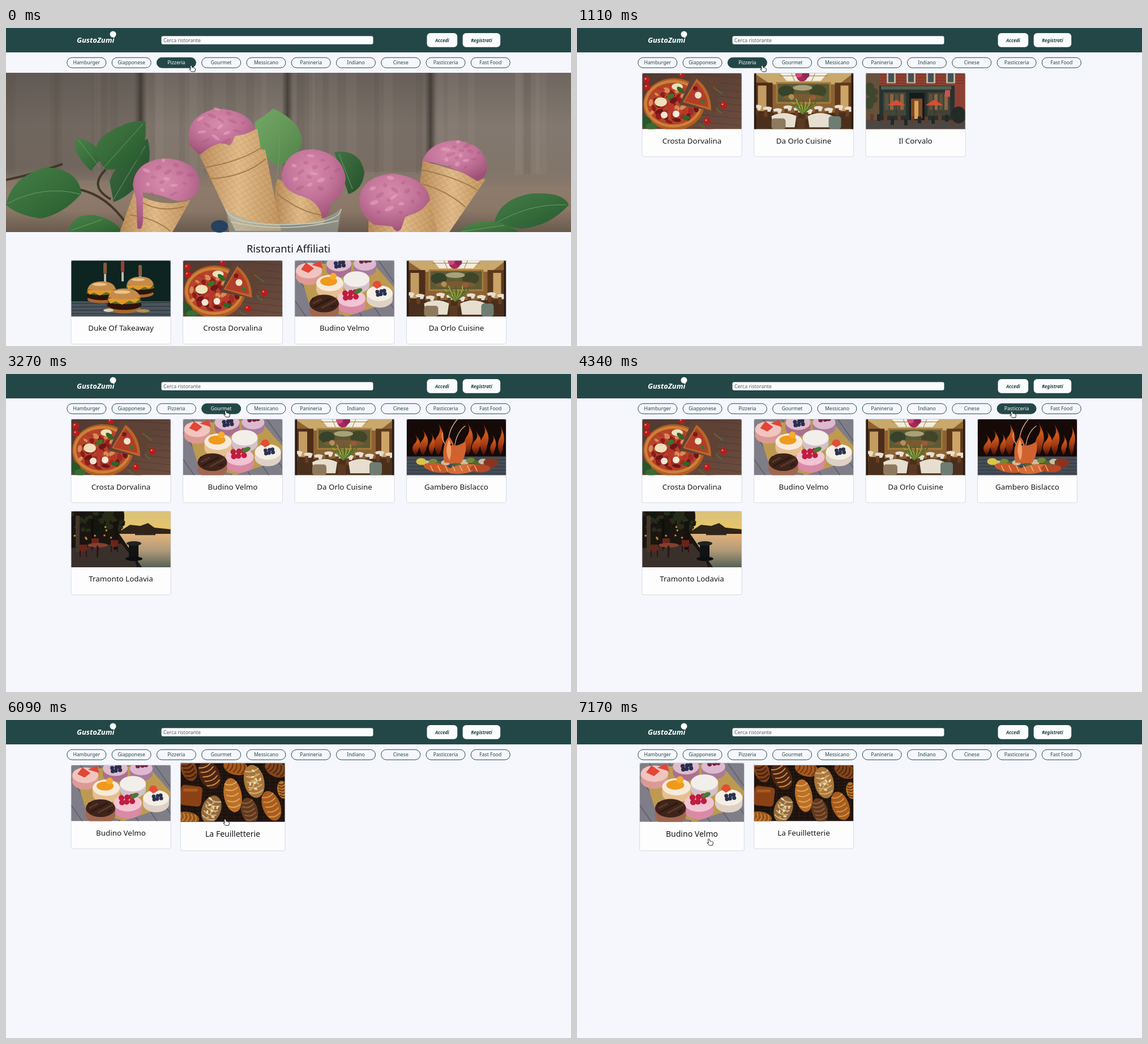
These frames come from a looping animation (998 px wide and 561 px high, 7.2 s). An HTML page:

```html
<!DOCTYPE html>
<html lang="it">
<head>
<meta charset="utf-8">
<title>Ristoranti</title>
<style>
  html, body { margin: 0; width: 100%; height: 100%; overflow: hidden; background: #f5f7fd; }
  #stage { display: block; width: 100vw; height: 100vh; font-family: "Noto Sans", "Open Sans", sans-serif; font-weight: 500; }
  .mid { text-anchor: middle; }
</style>
</head>
<body>
<svg id="stage" viewBox="0 0 998 561"></svg>
<script>
const LOOP = 7200, DARK = '#234747', PAGE = '#f5f7fd', INK = '#15191c';
const stage = document.getElementById('stage');

// Shape helpers
const box = (x, y, w, h, fill, more = '') => `<rect x="${x}" y="${y}" width="${w}" height="${h}" fill="${fill}" ${more}/>`;
const oval = (x, y, rx, ry, fill, turn = 0) =>
  `<ellipse cx="${x}" cy="${y}" rx="${rx}" ry="${ry}" fill="${fill}" transform="rotate(${turn} ${x} ${y})"/>`;
const dot = (x, y, r, fill) => oval(x, y, r, r, fill);
const shape = (d, fill) => `<path d="${d}" fill="${fill}"/>`;
const line = (d, color, width = 1) => `<path d="${d}" fill="none" stroke="${color}" stroke-width="${width}"/>`;
const text = (x, y, size, label, more = '') => `<text x="${x}" y="${y}" font-size="${size}" ${more}>${label}</text>`;
const repeat = (n, draw) => Array.from({ length: n }, (_, i) => draw(i)).join('');
const stops = colors => colors.map((c, i) => `<stop offset="${i / (colors.length - 1)}" stop-color="${c}"/>`).join('');
const gradient = (id, colors, dir = 'x2="0" y2="1"') => `<linearGradient id="${id}" ${dir}>${stops(colors)}</linearGradient>`;
const glow = (id, colors) => `<radialGradient id="${id}" cx=".45" cy=".32" r=".72">${stops(colors)}</radialGradient>`;
function seeded(seed) {
  return (lo, hi) => {
    seed = (seed * 16807) % 2147483647;
    return +(lo + (hi - lo) * seed / 2147483647).toFixed(1);
  };
}

// Card pictures, each 176 x 99
function burgers() {
  const knife = (x, y, c) => box(x - 3, y, 6, 20, c, 'rx="2"') + box(x - 2, y + 20, 4, 16, '#b9b9ae');
  const burger = (x, y, s) => `<g transform="translate(${x} ${y}) scale(${s})">` +
    oval(0, 16, 28, 8, '#a8672f') + oval(0, 9, 30, 9, '#2a140d') + oval(0, 3, 30, 5, '#5c6a2c') +
    shape('M-29-2 L29-2 L18 6 L9 2 L-4 9 L-15 3 L-24 7Z', '#e09a28') +
    shape('M-28-3 Q-24-19 0-19 Q24-19 28-3 Q0 2-28-3Z', '#c68b4b') + oval(-4, -13, 14, 3, '#e9c48d') + '</g>';
  return box(0, 0, 176, 99, '#0d2420') + box(0, 72, 176, 27, '#4a555d') +
    repeat(4, i => line(`M0 ${76 + i * 6} L176 ${74 + i * 7}`, '#2f3940', 1.5)) +
    knife(60, 4, '#8d5938') + knife(122, 8, '#8d5938') +
    burger(54, 54, .9) + burger(122, 45, .85) + knife(91, 1, '#a23b33') + burger(94, 69, 1.02) +
    oval(66, 88, 9, 3, '#d9cfb5') + oval(127, 89, 12, 3, '#b58e4d');
}

function pizza() {
  const rnd = seeded(41);
  const tomato = (x, y, r = 6) => dot(x, y, r, '#b81c1a') + dot(x - 2, y - 2, r / 4, '#f0876d');
  const toppings = repeat(44, i => {
    const a = i * 2.4, d = Math.sqrt(i / 44);
    return oval(55 + 43 * d * Math.cos(a), 55 + 33 * d * Math.sin(a), rnd(4, 8), rnd(2, 5),
      ['#8e1d1c', '#b5382a', '#6f1519', '#d98a55', '#a32b25'][i % 5], rnd(0, 180));
  });
  return box(0, 0, 176, 99, 'url(#table)') +
    repeat(9, i => line(`M90 ${i * 12} L176 ${i * 12 + 9}`, '#4b362c', .7)) +
    oval(56, 55, 54, 46, '#ae5c24') + oval(55, 54, 51, 42, '#cd8038') + oval(55, 54, 46, 37, '#b4442a') + toppings +
    shape('M66 56 L88 4 L140 10 L130 68Z', '#604235') +
    shape('M72 51 L96 10 Q122 30 122 66Z', '#b9652a') + shape('M75 50 L96 16 Q115 34 117 60Z', '#b23d28') +
    dot(99, 39, 6, '#f0e4cb') + dot(94, 27, 4, '#7c1a1b') + oval(107, 50, 5, 3, '#3d742b', 40) +
    oval(33, 51, 11, 8, '#f0dfb8') + oval(60, 72, 6, 6, '#f4ecd9') + dot(39, 74, 6, '#efe6d2') + oval(62, 24, 10, 6, '#eee0bd') +
    oval(68, 30, 8, 4, '#2f6426', 40) + oval(50, 41, 7, 4, '#3d742b', -30) + oval(78, 79, 7, 4, '#2f6426') +
    tomato(8, 12) + tomato(9, 25) + tomato(144, 57) + tomato(115, 85) + tomato(70, 4, 5) +
    oval(5, 85, 15, 9, '#28552a', 40) + oval(16, 94, 10, 6, '#376c33') +
    line('M126 25 L143 38 M130 62 L140 71 M100 90 L111 97', '#5a6838', 2);
}

function mousse() {
  const cake = (x, y, r, side, top) => oval(x, y + r * .48, r, r * .62, side) + box(x - r, y, 2 * r, r * .48, side) + oval(x, y, r, r * .6, top);
  const berries = (x, y, n, r, color) => repeat(n, i => dot(x + (i % 3 - 1) * r * 1.8 + i % 2, y + (Math.floor(i / 3) - .5) * r * 1.6 - i % 3, r, color));
  return box(0, 0, 176, 99, '#7f7d87') + repeat(7, i => line(`M${i * 33 - 50} 0 L${i * 33 + 20} 99`, '#5f5d67', 1.5)) +
    shape('M5 9 L134 0 L176 48 L172 72 L92 99 L25 75Z', '#bd9a50') +
    cake(25, 18, 23, '#dc9a94', '#f0c5c0') + cake(78, 6, 22, '#a9708f', '#dfbccb') + cake(124, 6, 20, '#a77c9b', '#ddb9d1') +
    berries(79, 8, 6, 3.6, '#2a2e50') + berries(125, 5, 3, 4, '#71243d') +
    shape('M11 16 L20 4 L34 14 L24 22Z M30 8 L45 1 L50 14Z', '#e34536') +
    cake(62, 40, 24, '#e6bf92', '#f6eadb') + oval(60, 37, 15, 8, '#f09a1c') + dot(68, 28, 6, '#f5ad2e') +
    cake(109, 33, 23, '#d3c0c8', '#f2eeea') + cake(150, 58, 23, '#dfd1c5', '#f5eee4') +
    berries(152, 58, 6, 3.4, '#283250') + shape('M137 44 Q140 33 150 37 L154 45 L145 50Z', '#e34d36') +
    cake(100, 67, 25, '#d98aa6', '#f2c4d2') + berries(98, 62, 6, 5, '#c01c41') + oval(112, 54, 8, 4, '#487a35', -25) +
    cake(52, 76, 26, '#a06750', '#3e241a') + repeat(22, i => dot(32 + i * 1.9, 68 + i * 7 % 16, 2, i % 2 ? '#5d3a2b' : '#2c1812'));
}

function diningRoom() {
  const table = (x, y, w) => shape(`M${x - w} ${y} Q${x} ${y - w / 2} ${x + w} ${y} L${x + w - 3} ${y + w * .9} L${x - w + 3} ${y + w * .9}Z`, '#e6dfd0');
  return box(0, 0, 176, 99, '#8d6233') + shape('M0 0 H176 L150 20 H30Z', '#c9a86c') + shape('M46 0 H130 L118 14 H58Z', '#f3eddd') +
    line('M66 0 L72 14 M108 0 L102 14 M46 5 H130', '#8f7a50') + box(0, 17, 33, 56, '#4c2d1a') + box(143, 17, 33, 56, '#5d391b') +
    box(7, 22, 15, 45, '#c39c62') + box(153, 22, 14, 45, '#cda468') +
    box(39, 16, 97, 38, '#a57a3a') + box(42, 19, 91, 32, '#5c5a35') +
    oval(57, 32, 14, 10, '#37422a') + oval(113, 32, 15, 11, '#424628') + oval(86, 26, 17, 5, '#a8a279') + oval(87, 43, 36, 6, '#7a5a33') +
    oval(66, 42, 5, 5, '#b58d58') + oval(104, 43, 6, 4, '#9a5b36') +
    box(0, 70, 176, 29, '#4a2f1d') + dot(85, 5, 10, '#a32a5c') + dot(79, 2, 6, '#d24b77') + dot(92, 3, 6, '#8e2555') +
    repeat(10, i => table(6 + i * 18, 58 + i * 3 % 8, 8) + box(i * 18, 62 + i * 3 % 8, 6, 12, '#6a3f22')) +
    table(53, 76, 22) + table(117, 76, 22) + box(31, 80, 25, 19, '#8d7a5c', 'rx="5"') + box(132, 76, 22, 23, '#6e7c72', 'rx="5"') + box(76, 80, 14, 19, '#5b3a23') +
    repeat(13, i => line(`M86 72 Q${66 + i * 4} 53 ${62 + i * 4} ${45 + i % 3 * 6}`, i % 2 ? '#92a83c' : '#476a2a', 2)) +
    box(0, 0, 4, 99, '#2b1b14') + box(172, 0, 4, 99, '#2b1b14');
}

function brickHouse() {
  const parasol = (x, y) => line(`M${x} ${y} V${y + 22}`, '#38241f') + shape(`M${x - 16} ${y + 6} L${x} ${y - 4} L${x + 16} ${y + 6}Z`, '#d35035');
  const rnd = seeded(8);
  return box(0, 0, 176, 99, '#8d4032') + repeat(4, i => line(`M0 ${i * 5 + 3} H176`, '#74352c')) +
    box(0, 0, 25, 99, '#66513b') + repeat(4, i => box(37 + i * 35, 0, 16, 18, '#c3b99d') + box(40 + i * 35, 0, 10, 16, '#465056')) +
    box(24, 22, 133, 62, '#27322e') + box(27, 23, 124, 6, '#526052') + box(31, 34, 40, 41, '#43463a') + box(109, 34, 40, 41, '#414237') +
    repeat(8, i => box(34 + i % 4 * 9 + (i > 3 ? 78 : 0), 37, 6, 28, i % 2 ? '#8b6640' : '#59513d')) +
    box(77, 35, 27, 49, '#151b1b') + box(80, 45, 20, 35, '#7d4a24') + box(86, 49, 7, 32, '#d9a55c') +
    box(0, 83, 176, 16, '#4d4743') + parasol(54, 51) + parasol(121, 51) + box(140, 30, 9, 12, '#cf5052') +
    repeat(14, i => box(8 + i * 12, rnd(72, 83), 6, 12, i % 2 ? '#2a2522' : '#643c2b')) +
    repeat(9, () => oval(rnd(0, 18), rnd(20, 80), 8, 7, '#3f4730')) + oval(164, 74, 13, 15, '#242b27');
}

function seafood() {
  const rnd = seeded(19);
  const flame = (x, h, w) => shape(`M${x} 64 Q${x - w * 2} ${64 - h / 3} ${x} ${64 - h * .6} Q${x + w} ${64 - h * .8} ${x - 2} ${64 - h} Q${x + w * 2.4} ${64 - h * .6} ${x + w} ${64 - h * .3} Q${x + w} 56 ${x} 64Z`, 'url(#fire)');
  return box(0, 0, 176, 99, '#150a08') +
    repeat(9, i => flame([16, 29, 44, 56, 108, 122, 136, 152, 166][i], rnd(38, 62), rnd(4, 7))) +
    box(0, 66, 176, 33, '#454e57') + repeat(5, i => line(`M0 ${72 + i * 6} H176`, '#333c44', 1.5)) +
    repeat(12, i => oval(25 + i * 11, 73 + i * 5 % 8, 8, 5, ['#4f6a2a', '#c4bfa5', '#748736'][i % 3])) +
    oval(26, 75, 9, 6, '#dcc543') + oval(149, 77, 13, 8, '#8a3420') +
    line('M78 62 Q66 28 90 0 M84 60 Q85 25 104 12 M80 60 Q58 35 64 24', '#e9b18a', 1.3) +
    shape('M67 77 Q60 50 75 30 Q80 36 84 47 Q96 46 104 39 Q108 60 96 78Z', '#d0622f') +
    shape('M75 35 Q66 58 76 73 Q82 56 75 35Z', '#f1a16a') +
    oval(54, 86, 24, 8, '#cb5a29', 10) + oval(100, 88, 28, 8, '#d46d38', -8) + oval(130, 87, 18, 7, '#b94725') +
    repeat(7, i => line(`M${42 + i * 13} 82 l5 10`, '#f3b184', 1.5)) + dot(79, 45, 1.5, '#1b0d0a');
}

function waterside() {
  const rnd = seeded(77);
  const chair = (x, y) => box(x, y, 13, 12, '#6b241b') + line(`M${x + 1} ${y + 10} V${y + 22} M${x + 12} ${y + 10} V${y + 22}`, '#35120f', 2);
  return box(0, 0, 176, 99, 'url(#dusk)') + shape('M90 33 L104 24 L122 26 L136 21 L147 29 L176 32 V40 H80Z', '#2e2419') +
    shape('M74 40 H176 V99 H122Z', 'url(#lake)') + line('M113 41 H149 M125 40 L132 35', '#33271e', 2.5) +
    shape('M0 0 H93 Q97 19 85 40 L125 99 H0Z', '#1a1510') + shape('M0 65 L89 57 L122 99 H0Z', '#3a302b') +
    repeat(45, () => oval(rnd(0, 92), rnd(0, 34), rnd(3, 9), rnd(2, 5), rnd(0, 1) > .5 ? '#10170f' : '#272c1a', rnd(0, 180))) +
    box(8, 8, 7, 64, '#44372a') + box(35, 15, 5, 50, '#110e0a') + box(75, 18, 8, 50, '#15110d') +
    repeat(8, () => dot(rnd(5, 75), rnd(25, 50), 1.8, '#c9842f')) +
    chair(15, 59) + chair(36, 48) + chair(70, 51) + oval(47, 60, 18, 4, '#84402f') + box(45, 61, 3, 21, '#2a1713') +
    box(102, 57, 17, 27, '#101214', 'rx="3"') + oval(111, 57, 13, 4, '#202123') + oval(111, 84, 15, 4, '#0c0e10') + line('M114 86 L118 99', '#161719', 3);
}

function pastries() {
  const bun = (x, y, a, b, turn, c, stripe) => `<g transform="translate(${x} ${y}) rotate(${turn})">` + oval(0, 0, a, b, c) +
    repeat(5, i => line(`M${(i - 2) * a * .33 - 2} ${-b * .7} Q${(i - 2) * a * .33 + 5} 0 ${(i - 2) * a * .33 - 2} ${b * .7}`, stripe, 2)) + '</g>';
  const almonds = (x, y) => repeat(16, i => oval(x + Math.cos(i * 2.4) * i * .8, y + Math.sin(i * 2.4) * i * 1.2, 3, 1.6, i % 2 ? '#ecd9ae' : '#c9a468', i * 50));
  return box(0, 0, 176, 99, '#1c120d') + repeat(18, i => line(`M${i * 10} 0 V99 M0 ${i * 6} H176`, '#35261c', .6)) +
    bun(14, 10, 21, 13, 70, '#7d3f18', '#38190c') + bun(49, 20, 25, 17, 65, '#4d2512', '#c48a45') + bun(93, 7, 21, 13, 15, '#a5591d', '#6d3411') +
    bun(124, 31, 28, 17, 78, '#a9763a', '#d2b07a') + almonds(124, 31) + bun(161, 10, 20, 13, 25, '#83451d', '#4c250f') + bun(172, 45, 15, 9, 80, '#b87426', '#6b3414') +
    box(0, 38, 36, 34, '#8a4215', 'rx="6" transform="rotate(6 18 55)"') + box(5, 43, 24, 5, '#a95b20') +
    bun(88, 54, 29, 15, 80, '#bb7028', '#e0a857') + bun(52, 78, 24, 16, 110, '#94683a', '#cdb88c') + almonds(52, 78) +
    bun(116, 80, 22, 14, 75, '#62391f', '#8f6138') + bun(153, 72, 26, 15, 70, '#a65c20', '#d8933f') + bun(12, 92, 20, 10, 10, '#97541b', '#c4863a');
}

// Wide picture on the landing screen
function hero() {
  const rnd = seeded(5);
  const cone = d => ['#d6ad79', 'url(#waffle)', 'url(#shade)'].map(fill => shape(d, fill)).join('');
  const scoop = (d, x, y, r) => shape(d, 'url(#berry)') + repeat(16, i => {
    const a = i * 2.4, q = r * Math.sqrt(i / 16);
    return oval(x + q * Math.cos(a), y + q * .7 * Math.sin(a), rnd(3, 9), rnd(2, 4), i % 3 ? '#a04a7244' : '#eeb0c877', rnd(-40, 40));
  });
  const leaf = (d, vein, c = '#2c6532') => shape(d, c) + shape(d, 'url(#sheen)') + line(vein, '#6f9c62', 1);
  return box(0, 79, 998, 281, 'url(#wood)') +
    box(0, 79, 240, 190, 'url(#gloom)') + box(497, 79, 253, 175, '#453b35', 'opacity=".14"') +
    repeat(36, i => box(rnd(0, 980), 79, rnd(6, 22), 180, i % 2 ? '#aa9f96' : '#453c37', 'opacity=".1"')) +
    [238, 497, 750].map(x => box(x - 10, 79, 20, 180, 'url(#seam)')).join('') +
    box(0, 246, 998, 114, 'url(#bench)') +
    line('M0 268 Q50 258 100 240 M130 285 Q178 295 213 346 M176 250 Q145 280 185 302', '#41372a', 4) +
    leaf('M183 270 Q195 235 250 195 Q262 240 235 275 Q212 300 190 307Z', 'M190 302 L246 208', '#24542d') +
    leaf('M150 252 Q112 215 125 195 Q150 195 172 225Z', 'M128 198 L165 245', '#336f37') +
    leaf('M177 250 Q140 211 180 185 Q220 160 246 165 Q250 215 225 240 Q200 250 177 250', 'M172 247 L242 169') +
    leaf('M0 312 Q10 262 70 246 Q128 248 133 292 Q100 330 60 336 Q20 330 0 312', 'M2 310 Q65 276 131 293', '#2f6c35') +
    leaf('M110 360 Q117 325 160 331 Q195 340 205 360Z', 'M115 357 L170 338', '#337136') +
    leaf('M478 243 Q437 215 440 165 Q455 157 472 142 Q522 165 523 200 Q515 235 478 243', 'M472 145 Q490 190 478 265', '#68a05b') +
    leaf('M580 219 Q626 213 633 255 Q630 285 605 293Z', 'M588 222 L612 284', '#2a5c31') +
    leaf('M862 346 Q870 301 930 292 Q985 289 994 312 Q960 350 910 354Z', 'M864 345 Q925 309 990 312', '#2e6836') +
    leaf('M798 360 Q830 332 875 345 Q900 353 905 360Z', 'M805 359 L880 348', '#3c773a') +
    oval(377, 350, 15, 11, '#26405f') +
    cone('M226 290 Q275 320 326 303 L294 360 H201Z') + line('M230 302 Q270 328 314 315 M219 330 Q260 334 290 358', '#a5794b', 2) +
    scoop('M224 278 Q227 233 283 230 Q341 234 343 278 Q333 310 298 304 Q267 292 242 290 L242 340 Q240 360 232 353 L230 302Z', 284, 266, 48) +
    cone('M336 212 L444 178 L450 214 L458 215 L486 358 H405Z') + line('M345 247 Q412 237 451 211 M357 266 Q420 264 459 231', '#a5794b', 2) +
    scoop('M325 208 Q312 158 370 142 Q429 144 440 179 Q422 190 404 190 Q398 212 389 205 Q374 198 342 224Z', 378, 174, 46) +
    cone('M480 266 L556 306 Q570 326 560 346 H484 Q469 292 480 266Z') + line('M478 292 Q520 325 558 330', '#a5794b', 2) +
    scoop('M487 257 Q495 214 542 214 Q594 220 600 265 Q596 300 574 307 Q568 342 558 335 Q555 308 526 298 Q485 287 487 257', 544, 257, 47) +
    cone('M736 234 L847 267 L783 360 H757 L730 284Z') + line('M734 250 Q795 263 833 286 M735 275 Q777 286 812 316', '#a5794b', 2) +
    scoop('M735 235 Q749 199 797 198 Q848 205 850 247 Q846 268 832 270 Q787 240 735 235', 803, 225, 36) +
    cone('M640 340 Q710 350 747 300 L762 360 H640Z') +
    scoop('M624 301 Q630 260 685 257 Q742 264 749 303 Q734 328 706 331 L698 354 Q690 365 682 350 L650 347 Q624 329 624 301', 685, 298, 50) +
    shape('M389 320 Q440 350 488 345 Q552 349 592 319 L586 360 H394Z', '#a3b1a988') +
    line('M389 320 Q396 346 488 347 Q590 346 592 319 M397 342 Q488 363 587 340', '#c6d0c5', 1.5);
}

const pictures = { burgers, pizza, mousse, diningRoom, brickHouse, seafood, waterside, pastries };
const titles = {
  burgers: 'Duke Of Takeaway', pizza: 'Crosta Dorvalina', mousse: 'Budino Velmo', diningRoom: 'Da Orlo Cuisine',
  brickHouse: 'Il Corvalo', seafood: 'Gambero Bislacco', waterside: 'Tramonto Lodavia', pastries: 'La Feuilletterie'
};
const screens = [
  { from: 0, top: 410, cards: ['burgers', 'pizza', 'mousse', 'diningRoom'] },
  { from: 370, top: 79.5, cards: ['pizza', 'diningRoom', 'brickHouse'] },
  { from: 2500, top: 79.5, cards: ['pizza', 'mousse', 'diningRoom', 'seafood', 'waterside'] },
  { from: 4750, top: 79.5, cards: ['mousse', 'pastries'] }
];
const pills = ['Hamburger', 'Giapponese', 'Pizzeria', 'Gourmet', 'Messicano', 'Panineria', 'Indiano', 'Cinese', 'Pasticceria', 'Fast Food'];
const pillX = i => 107.8 + i * 79.28;
const cardX = i => 115 + i % 4 * 197.5;

const card = (name, i, top) => {
  const x = cardX(i), y = top + Math.floor(i / 4) * 162.5;
  return `<g class="card">` + box(x, y, 176, 147.5, '#fdfdfe', 'rx="3"') +
    `<use href="#${name}" x="${x}" y="${y}" width="176" height="99"/>` +
    box(x, y, 176, 147.5, 'none', 'rx="3" stroke="#cfd2da" stroke-width=".8"') +
    text(x + 88, y + 124, 13.4, titles[name], `class="mid" fill="${INK}"`) + '</g>';
};
const button = (x, w, label) => box(x, 9, w, 24.7, '#fbfcfe', 'rx="6"') +
  text(x + w / 2, 24.8, 8.1, label, 'class="mid" font-weight="700" font-style="italic" fill="#1f3f41"');

stage.innerHTML = '<defs>' +
  gradient('wood', ['#6e665f', '#82786f', '#82756a', '#76685c']) + gradient('bench', ['#82756a00', '#8d7b6b', '#8a7767', '#685a4d']) +
  gradient('gloom', ['#3a343044', '#3a343033'], '') + gradient('seam', ['#3a332e00', '#3a332ecc', '#3a332e00'], '') +
  gradient('shade', ['#8a5a2a66', '#f5d9ac55', '#9a682f55'], '') + gradient('sheen', ['#9cc48a33', '#0b2a1544'], 'x2="1" y2="1"') +
  glow('berry', ['#d78cac', '#c4749a', '#9d5075']) + gradient('table', ['#503830', '#6c4d3f'], 'x2="1" y2="1"') +
  gradient('fire', ['#7a210d', '#cf5a1c', '#a33a12', '#3a0f08']) + gradient('dusk', ['#d9c27c', '#f0c65c', '#e88f3a']) + gradient('lake', ['#e2b27a', '#b09a78', '#566056']) +
  '<pattern id="waffle" width="13" height="11" patternUnits="userSpaceOnUse" patternTransform="rotate(12)">' + line('M0 0 L13 11 M13 0 L0 11', '#a9753f66', 1.3) + '</pattern>' +
  Object.entries(pictures).map(([id, draw]) => `<symbol id="${id}" viewBox="0 0 176 99" preserveAspectRatio="none">${draw()}</symbol>`).join('') + '</defs>' +
  box(0, 0, 998, 561, PAGE) +
  screens.map((s, n) => '<g class="screen">' +
    (n ? '' : hero() + text(499, 396, 18.4, 'Ristoranti Affiliati', `class="mid" fill="${INK}"`)) +
    s.cards.map((name, i) => card(name, i, s.top)).join('') + '</g>').join('') +
  box(0, 0, 998, 43, DARK) +
  text(125, 26, 13, 'GustoZumi', 'font-weight="700" font-style="italic" fill="#fff"') + dot(189, 11, 5.5, '#fff') +
  box(274.5, 14.3, 374, 14.4, '#fbfcfe', 'rx="3"') + text(278, 25, 8.8, 'Cerca ristorante', 'fill="#565b60"') +
  button(743.5, 53.7, 'Accedi') + button(806.7, 66.5, 'Registrati') +
  pills.map((label, i) => '<g class="pill">' + box(pillX(i), 52.2, 69, 18, PAGE, `rx="9" stroke="${DARK}"`) +
    text(pillX(i) + 34.5, 64.3, 8.7, label, 'class="mid"') + '</g>').join('') +
  '<g id="cursor" stroke-linejoin="round"><path id="hand" d="M-1 0 Q.6-1 1.2 1 L2 4 Q4 3 4.5 4.5 Q6 4 6.3 5.3 Q7.5 5 7.5 7 L6.6 11 H.5 L-3.4 6.6 Q-3 5.5-.6 7 L-1.5 1.2Z" fill="#fff" stroke="#111" stroke-width=".9"/>' +
  '<path id="arrow" d="M0 0 V10 L2.3 8 L4 11.5 L5.6 10.7 L4 7.4 H7Z" fill="#111" stroke="#fff" stroke-width=".6"/></g>';

const find = selector => [...stage.querySelectorAll(selector)];
const screenNodes = find('.screen'), pillNodes = find('.pill');
const lastCards = [...screenNodes[3].querySelectorAll('.card')];
const [cursor, hand, arrow] = ['cursor', 'hand', 'arrow'].map(id => document.getElementById(id));

// Pointer path: time, x, y
const path = [
  [0, 327, 66], [1600, 327, 66], [2000, 388, 65], [3300, 388, 65], [3950, 768, 66], [5080, 768, 66], [5125, 765, 69],
  [5280, 733, 105], [5800, 400, 170], [6080, 387, 175], [6250, 387, 175], [6600, 250, 200], [7100, 233, 210], [7200, 233, 210]
];
function pointer(t) {
  const next = path.findIndex(p => p[0] > t);
  if (next < 1) return path[next < 0 ? path.length - 1 : 0].slice(1);
  const [t0, x0, y0] = path[next - 1], [t1, x1, y1] = path[next];
  const k = (t - t0) / (t1 - t0);
  return [x0 + (x1 - x0) * k, y0 + (y1 - y0) * k];
}

const onPill = (i, [x, y]) => x >= pillX(i) && x <= pillX(i) + 69 && y >= 52 && y <= 70.5;
const onCard = (i, [x, y]) => x >= cardX(i) && x <= cardX(i) + 176 && y >= 79.5 && y <= 227;

// Share of the last `span` ms spent hovering, which is a linear transition
function hover(test, i, t, span) {
  let hits = 0;
  for (let k = 0; k < 30; k++) hits += test(i, pointer(t - k * span / 30));
  return hits / 30;
}
const mix = (a, b, k) => `rgb(${a.map((v, i) => Math.round(v + (b[i] - v) * k))})`;
const smooth = k => k * k * (3 - 2 * k);

function render(t) {
  const current = screens.filter(s => s.from <= t).length - 1;
  screenNodes.forEach((node, i) => node.style.display = i === current ? '' : 'none');
  const at = pointer(t);
  let pointing = false;

  pillNodes.forEach((node, i) => {
    const k = hover(onPill, i, t, 300);
    node.firstChild.setAttribute('fill', mix([245, 247, 253], [35, 71, 71], k));
    node.lastChild.setAttribute('fill', mix([35, 71, 71], [250, 252, 255], k));
    pointing ||= onPill(i, at);
  });
  if (current === 3) lastCards.forEach((node, i) => {
    const scale = 1 + .05 * smooth(hover(onCard, i, t, 200));
    const cx = cardX(i) + 88, cy = 153.2;
    node.setAttribute('transform', `translate(${cx} ${cy}) scale(${scale}) translate(${-cx} ${-cy})`);
    pointing ||= onCard(i, at);
  });

  cursor.setAttribute('transform', `translate(${at})`);
  hand.style.display = pointing ? '' : 'none';
  arrow.style.display = pointing ? 'none' : '';
}

const start = performance.now();
function tick(now) {
  render(Math.max(0, now - start) % LOOP);
  requestAnimationFrame(tick);
}
render(0);
requestAnimationFrame(tick);
</script>
</body>
</html>
```
